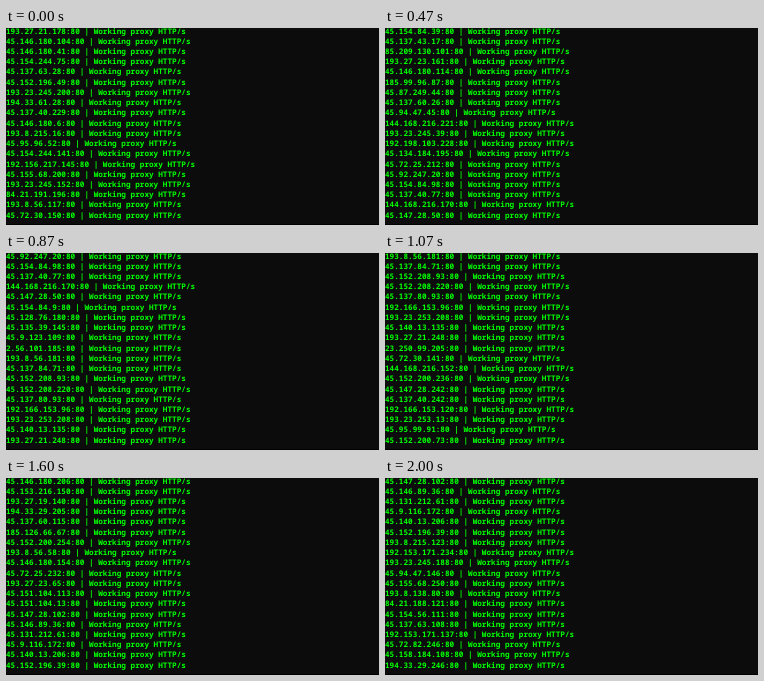
An HTML page for the animation above (2.07 s loop, 373 by 197 pixels).

```html
<!DOCTYPE html>
<html lang="en">
<head>
<meta charset="utf-8">
<title>Proxy checker</title>
<style>
  html, body { margin: 0; width: 100%; height: 100%; overflow: hidden; background: #0c0c0c; }
  svg { display: block; }
  text {
    font: 600 7.69px "Noto Sans Mono", "DejaVu Sans Mono", monospace;
    fill: #0f0;
    white-space: pre;
    text-rendering: geometricPrecision;
  }
</style>
</head>
<body>
<svg id="screen" width="373" height="197" viewBox="0 0 373 197">
  <rect y="196" width="373" height="1" fill="#000"/>
</svg>
<script>
const hosts = `
193.27.21.178 45.146.180.104 45.146.180.41 45.154.244.75 45.137.63.28
45.152.196.49 193.23.245.200 194.33.61.28 45.137.40.229 45.146.180.6
193.8.215.16 45.95.96.52 45.154.244.141 192.156.217.145 45.155.68.200
193.23.245.152 84.21.191.196 193.8.56.117 45.72.30.150 45.152.196.181
193.27.19.158 193.27.21.165 2.59.21.161 185.99.96.11 45.137.43.230
45.153.216.0 45.137.43.214 193.27.23.149 45.135.36.217 45.154.84.39
45.137.43.17 85.209.130.101 193.27.23.161 45.146.180.114 185.99.96.87
45.87.249.44 45.137.60.26 45.94.47.45 144.168.216.221 193.23.245.39
192.198.103.228 45.134.184.195 45.72.25.212 45.92.247.20 45.154.84.98
45.137.40.77 144.168.216.170 45.147.28.50 45.154.84.9 45.128.76.180
45.135.39.145 45.9.123.109 2.56.101.185 193.8.56.181 45.137.84.71
45.152.208.93 45.152.208.220 45.137.80.93 192.166.153.96 193.23.253.208
45.140.13.135 193.27.21.248 23.250.99.205 45.72.30.141 144.168.216.152
45.152.200.236 45.147.28.242 45.137.40.242 192.166.153.120 193.23.253.13
45.95.99.91 45.152.200.73 45.146.90.58 45.154.244.117 45.158.184.199
45.136.231.110 192.166.153.249 45.146.180.206 45.153.216.150 193.27.19.140
194.33.29.205 45.137.60.115 185.126.66.67 45.152.200.254 193.8.56.58
45.146.180.154 45.72.25.232 193.27.23.65 45.151.104.113 45.151.104.13
45.147.28.102 45.146.89.36 45.131.212.61 45.9.116.172 45.140.13.206
45.152.196.39 193.8.215.123 192.153.171.234 193.23.245.188 45.94.47.146
45.155.68.250 193.8.138.80 84.21.188.121 45.154.56.111 45.137.63.108
192.153.171.137 45.72.82.246 45.158.184.108 194.33.29.246
`.trim().split(/\s+/);

const LOOP = 2070, ROWS = 19, PITCH = 10.23, LAST_BASELINE = 189.7;

// [tick, lines scrolled]; the log advances 15 ticks per second
const scroll = [[0, 0], [3, 16], [7, 29], [13, 43], [19, 62], [24, 77], [30, 90]];

const screen = document.getElementById('screen');
const rows = Array.from({ length: ROWS }, (_, i) => {
  const row = document.createElementNS(screen.namespaceURI, 'text');
  row.setAttribute('x', 0);
  row.setAttribute('y', LAST_BASELINE - (ROWS - 1 - i) * PITCH);
  return screen.appendChild(row);
});

function scrolledLines(tick) {
  const k = Math.max(1, scroll.findIndex(([t]) => t >= tick));
  const [t0, n0] = scroll[k - 1], [t1, n1] = scroll[k];
  return Math.round(n0 + (n1 - n0) * (tick - t0) / (t1 - t0));
}

let shown = -1;
function draw(ms) {
  // ticks land on whole hundredths of a second
  const tick = Math.floor(Math.floor(ms % LOOP / 10) * 3 / 20);
  if (tick === shown) return;
  shown = tick;
  const top = scrolledLines(tick);
  rows.forEach((row, i) => {
    row.textContent = `${hosts[top + i]}:80 | Working proxy HTTP/s`;
  });
}

const start = performance.now();
function loop() {
  draw(performance.now() - start);
  requestAnimationFrame(loop);
}
loop();
</script>
</body>
</html>
```
